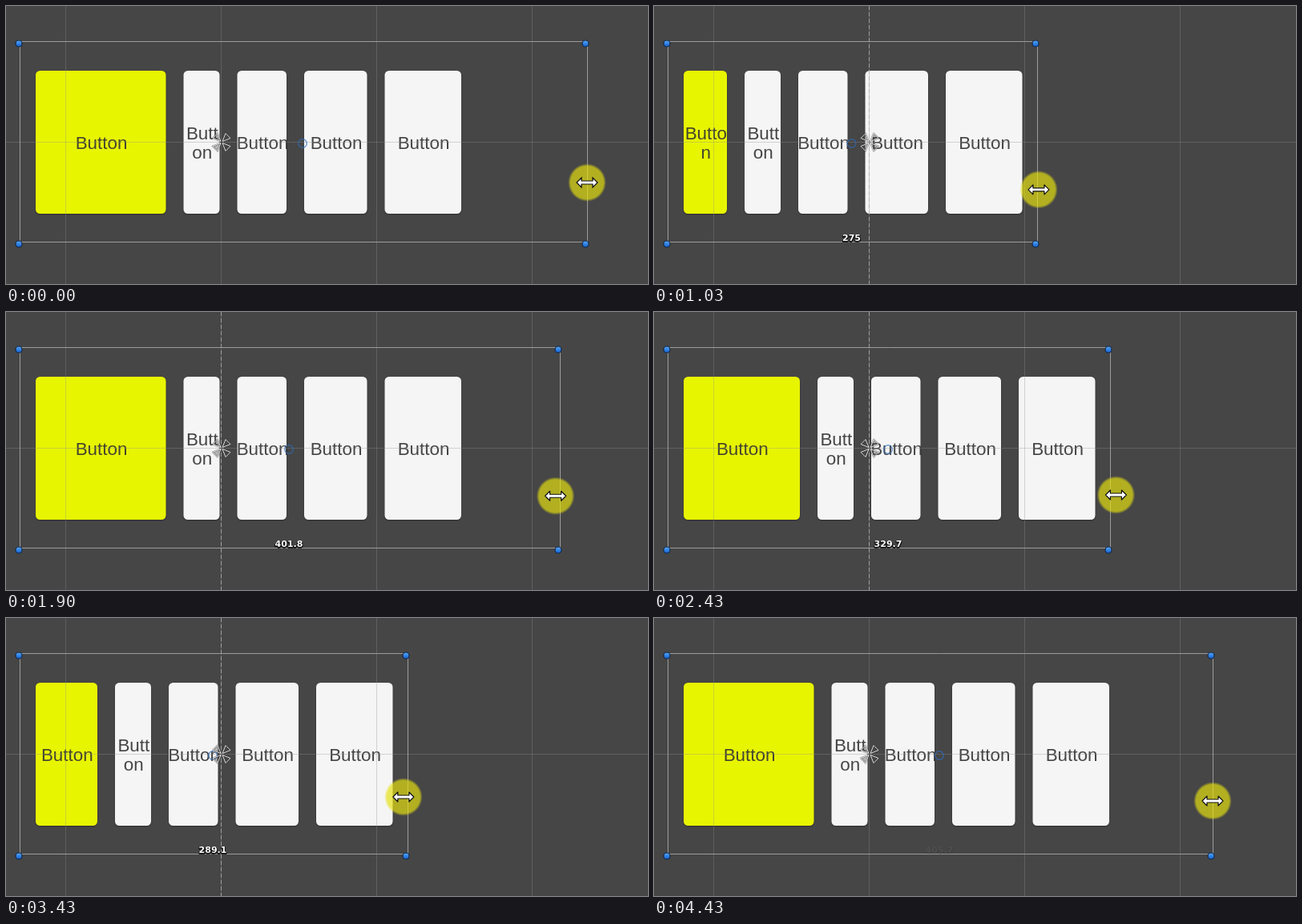
These frames come from a looping animation (801x348 px, 4.53 s). An HTML page with a canvas:

```html
<!DOCTYPE html>
<html lang="en">
<head>
<meta charset="utf-8">
<title>Resizing a layout group</title>
<style>
html, body { margin: 0; width: 100%; height: 100%; overflow: hidden; background: #464646; }
canvas { display: block; }
</style>
</head>
<body>
<canvas id="stage" width="801" height="348"></canvas>
<script>
const ctx = document.getElementById('stage').getContext('2d');
const LOOP = 4530, LEFT = 17.5, TOP = 44.5, BOTTOM = 296, GAP = 22;
const FIXED_WIDTHS = [45, 61.5, 78.5, 95.5];

// Keys are [tick, value] with 30 ticks per second.
const rightEdge = curve([
  [0, 725.5], [10, 725.5], [15, 713], [20, 659.37], [25, 540], [31, 478], [37, 454],
  [42, 456], [47, 491.67], [52, 600], [57, 691], [60, 715.5], [65, 715.5], [69, 670],
  [73, 569.9], [80, 497], [84, 467.5], [88, 452], [98, 452], [103, 501.74],
  [108, 600], [113, 679], [119, 697.48], [136, 697.48]
]);
const pointerY = curve([
  [0, 221], [10, 221], [20, 228], [47, 231], [60, 230], [73, 229], [84, 222],
  [98, 222], [103, 224], [119, 229], [136, 229]
]);

// Monotone cubic interpolation.
function curve(keys) {
  const rate = keys.slice(1).map(([x, y], i) => (y - keys[i][1]) / (x - keys[i][0]));
  const slope = keys.map((_, i) => {
    const a = rate[i - 1] || 0, b = rate[i] || 0;
    return a * b > 0 ? 2 * a * b / (a + b) : 0;
  });
  return x => {
    if (x <= keys[0][0]) return keys[0][1];
    let i = 0;
    while (i < keys.length - 2 && x >= keys[i + 1][0]) i++;
    const [x0, y0] = keys[i], [x1, y1] = keys[i + 1];
    const h = x1 - x0, u = Math.min(1, (x - x0) / h), v = 1 - u;
    return y0 * v * v * (1 + 2 * u) + y1 * u * u * (3 - 2 * u)
      + h * u * v * (slope[i] * v - slope[i + 1] * u);
  };
}

function line(x0, y0, x1, y1, color, dash = []) {
  ctx.strokeStyle = color;
  ctx.lineWidth = 1;
  ctx.setLineDash(dash);
  ctx.beginPath();
  ctx.moveTo(x0, y0);
  ctx.lineTo(x1, y1);
  ctx.stroke();
  ctx.setLineDash([]);
}

function circle(x, y, r, fill, stroke, width = 1) {
  ctx.beginPath();
  ctx.arc(x, y, r, 0, 7);
  if (fill) { ctx.fillStyle = fill; ctx.fill(); }
  if (stroke) { ctx.strokeStyle = stroke; ctx.lineWidth = width; ctx.stroke(); }
}

function polygon(points, fill, stroke, width = 1) {
  ctx.beginPath();
  points.forEach(p => ctx.lineTo(...p));
  ctx.closePath();
  ctx.fillStyle = fill;
  ctx.fill();
  ctx.strokeStyle = stroke;
  ctx.lineWidth = width;
  ctx.stroke();
}

function wrap(text, width) {
  const lines = [''];
  for (const c of text) {
    const last = lines.length - 1;
    if (lines[last] && ctx.measureText(lines[last] + c).width > width) lines.push(c);
    else lines[last] += c;
  }
  return lines;
}

function button(x, width, color) {
  ctx.fillStyle = color;
  ctx.beginPath();
  ctx.roundRect(x, 81, width, 179, 5.5);
  ctx.shadowColor = 'rgba(0,0,0,.35)';
  ctx.shadowBlur = 2;
  ctx.shadowOffsetY = 1;
  ctx.fill();
  ctx.shadowColor = 'transparent';

  ctx.font = '22.4px "Liberation Sans", Arial, sans-serif';
  ctx.textAlign = 'center';
  ctx.fillStyle = 'rgba(50,50,50,.9)';
  ctx.filter = 'blur(.7px)';
  const lines = wrap('Button', width + 4);
  lines.forEach((s, i) =>
    ctx.fillText(s, x + width / 2 + .8, 178.8 + (i - (lines.length - 1) / 2) * 24));
  ctx.filter = 'none';
}

function handle(x, y) {
  const shade = ctx.createLinearGradient(0, y - 4, 0, y + 4);
  shade.addColorStop(0, '#59a8f5');
  shade.addColorStop(1, '#0f5fd0');
  circle(x, y, 4, shade, '#14294a', 1.2);
}

function anchors(x, y) {
  for (const sx of [-1, 1]) for (const sy of [-1, 1]) {
    const petal = [[1, 1], [11, 5], [5, 11]].map(([a, b]) => [x + a * sx, y + b * sy]);
    polygon(petal, 'rgba(70,70,70,.35)', 'rgba(40,40,40,.5)', 2);
    polygon(petal, 'transparent', '#e4e4e4');
  }
}

function sizeLabel(text, x, alpha) {
  ctx.font = 'bold 11px "DejaVu Sans", sans-serif';
  ctx.textAlign = 'center';
  ctx.lineWidth = 2;
  ctx.lineJoin = 'round';
  ctx.strokeStyle = `rgba(0,0,0,${alpha * .75})`;
  ctx.strokeText(text, x, 294.5);
  ctx.fillStyle = `rgba(255,255,255,${alpha})`;
  ctx.fillText(text, x, 294);
}

function pointer(x, y) {
  const glow = ctx.createRadialGradient(x, y, 20.5, x, y, 23.8);
  glow.addColorStop(0, 'rgba(230,225,15,.68)');
  glow.addColorStop(1, 'rgba(230,225,15,0)');
  circle(x, y, 24, glow);
  const half = [[-13, 0], [-7, -6], [-7, -2]];
  const upper = [...half, ...half.map(([a, b]) => [-a, b]).reverse()];
  const lower = upper.slice(1, -1).reverse().map(([a, b]) => [a, -b]);
  polygon([...upper, ...lower].map(([a, b]) => [x + a, y + b]), '#fff', '#111', 1.2);
}

function draw(ms) {
  const tick = Math.floor((ms + 4) * .03);
  const edge = rightEdge(tick);
  const right = Math.round(edge - .5) + .5;
  const middle = (LEFT + right) / 2 - 1.5;
  const dragging = tick > 10 && tick < 121;

  ctx.fillStyle = '#464646';
  ctx.fillRect(0, 0, 801, 348);

  let x = 37;
  [Math.min(162.5, right - 424.5), ...FIXED_WIDTHS].forEach((width, i) => {
    button(x, width, i ? '#f5f5f5' : '#e8f500');
    x += width + GAP;
  });

  const grid = 'rgba(145,145,145,.35)';
  for (let gx = 74.5; gx < 801; gx += 194) line(gx, 0, gx, 348, grid);
  line(0, 170.5, 801, 170.5, grid);
  if (dragging) line(268.5, 0, 268.5, 348, 'rgba(175,175,175,.8)', [5, 3]);

  ctx.strokeStyle = '#9c9c9c';
  ctx.lineWidth = 1;
  ctx.strokeRect(LEFT, TOP, right - LEFT, BOTTOM - .5 - TOP);

  circle(middle, 172, 5.3, null, 'rgba(45,110,190,.7)', 1.4);
  anchors(269, 170.5);
  for (const hx of [16, right - 2.5]) for (const hy of [47, 298]) handle(hx, hy);

  const fade = Math.min(1, Math.max(.06, (133.5 - tick) / 7));
  if (tick > 10) sizeLabel(String(+(268.7 + (edge - 467.5) * .5957).toFixed(1)), middle, fade);

  // Ripple left by the mouse press.
  if (tick > 10 && tick < 24) {
    circle(725, 221, 2.2 * (tick - 10), null, `rgba(145,25,30,${Math.min(.7, (24 - tick) * .17)})`, 4);
  }
  pointer(rightEdge(tick - .4) - .5, pointerY(tick));
}

function play(now) {
  draw(now % LOOP);
  requestAnimationFrame(play);
}
requestAnimationFrame(play);
</script>
</body>
</html>
```
